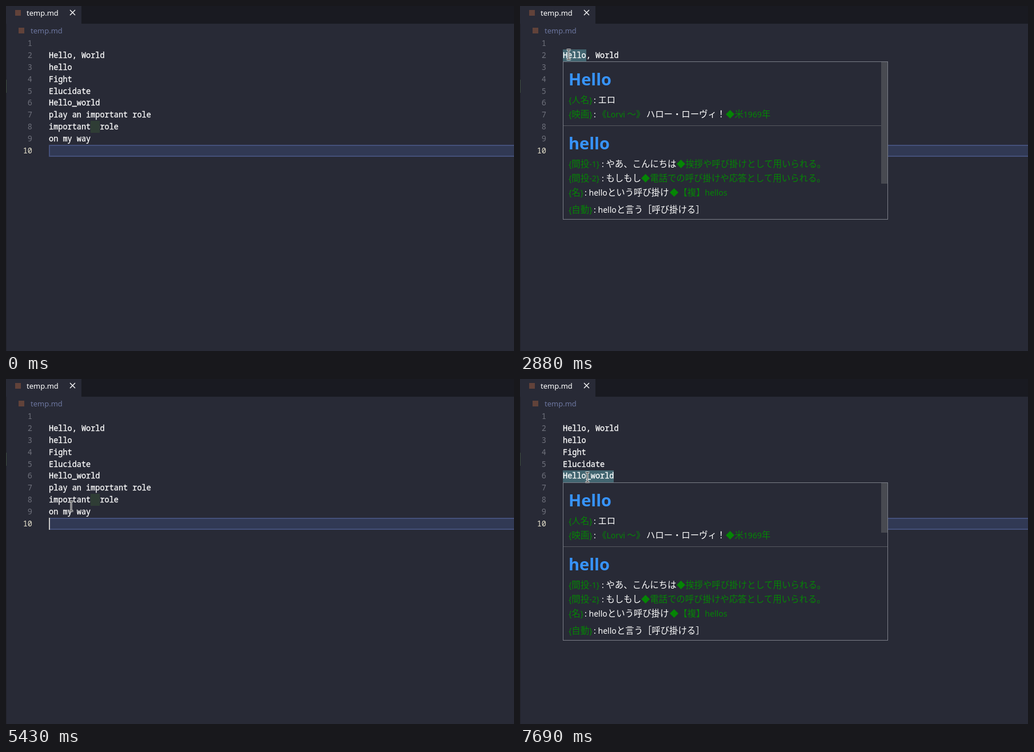
Recreate the animation shown at these times as an HTML page. Size 889 px wide and 604 px high, loop 8000 ms.

```html
<!DOCTYPE html>
<html lang="ja">
<head>
<meta charset="utf-8">
<title>Dictionary hover</title>
<style>
html, body { margin: 0; width: 100%; height: 100%; overflow: hidden; background: #282a36; }
#stage { position: relative; width: 889px; height: 604px; overflow: hidden; background: #282a36; color: #fff; }
#stage div, #stage svg { position: absolute; white-space: pre; }

.ui { font: 13px/18px 'Noto Sans', 'Open Sans', sans-serif; }
.tabs { inset: 0 0 auto; height: 31px; background: #191a21; }
.tab { left: 0; top: 0; width: 132px; height: 31px; background: #282a36; }
.icon { width: 10px; height: 10px; background: #61423a; }
.edge { left: 0; top: 31px; width: 1px; bottom: 0; background: #22232c; }
.mark { left: 0; top: 129px; width: 1px; height: 23px; background: #3c4a3e; }

.mono { top: 55px; font: 500 13.55px/20.87px 'Noto Sans Mono', 'DejaVu Sans Mono', monospace; }
.nums { left: 0; width: 46px; text-align: right; color: #6f717c; }
.nums b { font-weight: 500; color: #e9e4cf; }
.code { left: 75px; -webkit-text-stroke: .3px; }
.current { left: 75px; top: 243px; width: 830px; height: 17px; border: 2px solid #44507a; background: #313954; }
.blank { left: 148px; top: 201px; width: 16px; height: 21px; background: #2f3d35; }
.hl { height: 20.5px; background: #426570; }
.caret { left: 75px; top: 243px; width: 2px; height: 21px; background: #c8c8c6; }

.pop {
  box-sizing: border-box; width: 569px; height: 277px; overflow: hidden;
  border: 1px solid #7b7e88; background: #282a36;
  font: 15.4px/20px 'Noto Sans CJK JP', 'Noto Sans CJK', sans-serif; text-spacing-trim: space-all;
}
.pop .title { left: 9px; font: 700 29px/30px 'Noto Sans', 'Open Sans', sans-serif; color: #3794ff; }
.pop i { font: 14.1px/0 'Noto Sans', 'Open Sans', sans-serif; }
.pop .green { color: #058505; }
.pop .white { color: #fff; }
.rule { left: 0; right: 0; top: 111px; height: 1px; background: #55585f; }
.thumb { right: 0; top: 0; width: 11px; background: #484a51; }

.a1, .a2, .a3, .a4, .caret, .mouse, .beam, .arrow { animation: 8s linear infinite; }
.a1 { animation-name: first; }
.a2 { animation-name: second; }
.a3 { animation-name: third; }
.a4 { animation-name: fourth; }
@keyframes first { 0%, 19.87% { opacity: 0 } 21.12%, 43.62% { opacity: 1 } 43.63%, 100% { opacity: 0 } }
@keyframes second { 0%, 43.62% { opacity: 0 } 43.63%, 62.5% { opacity: 1 } 62.51%, 100% { opacity: 0 } }
@keyframes third { 0%, 75.25% { opacity: 0 } 76.5%, 88.5% { opacity: 1 } 88.51%, 100% { opacity: 0 } }
@keyframes fourth { 0%, 94.87% { opacity: 0 } 96.12%, 100% { opacity: 1 } }

.caret { animation-name: blink; animation-timing-function: step-end; }
@keyframes blink {
  0%, 72%, 84.5%, 97% { opacity: 0 }
  65.75%, 78.25%, 90.75% { opacity: 1 }
  100% { opacity: 0 }
}

.mouse { left: 0; top: 0; animation-name: roam; overflow: visible; }
@keyframes roam {
  0%, 3.11% { transform: translate(582px, 534px); opacity: 0 }
  3.12% { transform: translate(582px, 534px); opacity: 1; animation-timing-function: ease-out }
  12.5% { transform: translate(197px, 115px); animation-timing-function: ease-out }
  16.87%, 35.12% { transform: translate(82px, 85px) }
  36% { transform: translate(85px, 85px) }
  40.25%, 48.5% { transform: translate(150px, 85px) }
  51.12% { transform: translate(193px, 197px) }
  52.87%, 60.25% { transform: translate(205px, 222px) }
  62.87%, 64.5% { transform: translate(92px, 339px) }
  67.87% { transform: translate(114px, 223px); animation-timing-function: ease-out }
  72.12%, 79.87% { transform: translate(116px, 152px) }
  82.5% { transform: translate(167px, 89px) }
  85% { transform: translate(172px, 86px) }
  88.5% { transform: translate(150px, 140px) }
  90.25% { transform: translate(126px, 171px) }
  92%, 100% { transform: translate(118px, 172px); opacity: 1 }
}
.beam, .arrow { animation-timing-function: step-end; }
.beam { animation-name: beam; }
.arrow { animation-name: arrow; }
@keyframes beam { 0%, 62%, 88.5%, 100% { opacity: 1 } 48.8%, 80.4% { opacity: 0 } }
@keyframes arrow { 0%, 62%, 88.5%, 100% { opacity: 0 } 48.8%, 80.4% { opacity: 1 } }
</style>
</head>
<body>
<div id="stage">
  <div class="tabs"></div>
  <div class="tab"></div>
  <div class="icon" style="left:16px;top:7px"></div>
  <div class="ui" style="left:36px;top:3px">temp.md</div>
  <svg style="left:111px;top:6px" width="11" height="11" stroke="#fff" stroke-width="1.4"><path d="M1 1L10 10M10 1L1 10"/></svg>
  <div class="icon" style="left:22px;top:38px"></div>
  <div class="ui" style="left:43px;top:34px;color:#6c769f">temp.md</div>
  <div class="edge"></div>
  <div class="mark"></div>

  <div class="current"></div>
  <div class="blank"></div>
  <div class="hl a1" style="left:75px;top:76px;width:41px"></div>
  <div class="hl a2" style="left:132px;top:76px;width:41px"></div>
  <div class="hl a3" style="left:75px;top:139px;width:73px"></div>
  <div class="hl a4" style="left:75px;top:160px;width:89px"></div>
  <div class="mono nums">1
2
3
4
5
6
7
8
9
<b>10</b></div>
  <div class="mono code"><br>Hello, World
hello
Fight
Elucidate
Hello_world
play an important role
important  role
on my way</div>
  <div class="caret"></div>

  <div id="hello" class="pop a1" style="left:75px;top:97px"></div>
  <div id="world" class="pop a2" style="left:132px;top:97px;width:570px"></div>
  <div id="elucidate" class="pop a3" style="left:75px;top:0;height:139px"></div>
  <div id="helloWorld" class="pop a4" style="left:75px;top:181px"></div>

  <svg class="mouse" width="1" height="1" fill="none">
    <g class="beam">
      <path d="M-3.5-8.5H3.5M0-8.5V8.5M-3.5 8.5H3.5" stroke="#fff" stroke-width="3"/>
      <path d="M-3.5-8.5H3.5M0-8.5V8.5M-3.5 8.5H3.5" stroke="#111"/>
    </g>
    <path class="arrow" d="M.5.5V16.5L4.2 13L6.8 19L9.4 17.9L6.8 12H11.8Z" fill="#15161c" stroke="#fff" stroke-width="1.2"/>
  </svg>
</div>
<script>
const latin = s => s.replace(/[\x20-\x7e]+/g, m => `<i>${m}</i>`);
const title = (y, text) => `<div class="title" style="top:${y - 17}px">${text}</div>`;
const thumb = h => `<div class="thumb" style="height:${h}px"></div>`;

// A row is its centre line, then x and text pairs that alternate green and white.
function row([y, ...runs]) {
  let html = '';
  for (let i = 0; i < runs.length; i += 2) {
    const tone = i % 4 ? 'white' : 'green';
    html += `<div class="${tone}" style="left:${runs[i] - 1}px;top:${y - 12}px">${latin(runs[i + 1])}</div>`;
  }
  return html;
}
const rows = list => list.map(row).join('');
const fill = (id, html) => { document.getElementById(id).innerHTML = html; };

const greeting = title(32, 'Hello') + '<div class="rule"></div>' + title(144, 'hello') + rows([
  [67, 10, '{人名}', 54, ': エロ'],
  [92, 10, '{映画}', 54, ':', 61, '《Lorvi ～》', 146, 'ハロー・ローヴィ！', 285, '◆米1969年'],
  [179, 10, '{間投-1}', 68, ': やあ、こんにちは', 199, '◆挨拶や呼び掛けとして用いられる。'],
  [204, 10, '{間投-2}', 68, ': もしもし', 137, '◆電話での呼び掛けや応答として用いられる。'],
  [229, 10, '{名}', 38, ': helloという呼び掛け', 187, '◆【複】hellos'],
  [259, 10, '{自動}', 54, ': helloと言う［呼び掛ける］']
]);
fill('hello', greeting + thumb(213));
fill('helloWorld', greeting + thumb(87));

const noun = (y, n, ...rest) => [y, 10, `{名-${n}}`, 53, ':', 60, ...rest];
const the = '《the ～》';
fill('world', title(32, 'world') + rows([
  noun(67, 1, the, 133, '地球、地上、世界', 257, '◆【同】the earth'),
  noun(97, 2, the, 133, '宇宙、万物、万象', 257, '◆【同】the universe'),
  noun(126, 3, the + '〔地球上の〕', 225, '全人類、世界中の人々'),
  noun(152, 4, the, 133, '人類［人間］社会'),
  noun(177, 5, the + '〔歴史上のある時期の〕', 302, '世界、時代'),
  noun(202, 6, the + '〔地球上のある地域の〕', 302, '世界、諸国'),
  [228, 10, '◆the Worldとも表記される。'],
  noun(253, 7, '〔生物が存在できる〕', 214, '惑星、天体'),
  noun(278, 8, '〔ある分野や領域全体の〕', 245, '世界、～界')
]) + thumb(146));

fill('elucidate', title(32, 'elucidate') + rows([
  [67, 10, '{他動}', 54, ': ～を解明する、明瞭にする、明らかにする、はっきりさせる、説明する'],
  [92, 10, '【レベル】', 87, '12、', 118, '【発音】', 180, "ilu':side`it、", 258, '【@】', 305, 'エルースィデイトゥ、', 459, '【変化】'],
  [118, 10, '《動》', 56, 'elucidates | elucidating | elucidated、', 308, '【分節】', 371, 'e・lu・ci・date']
]));
</script>
</body>
</html>
```
